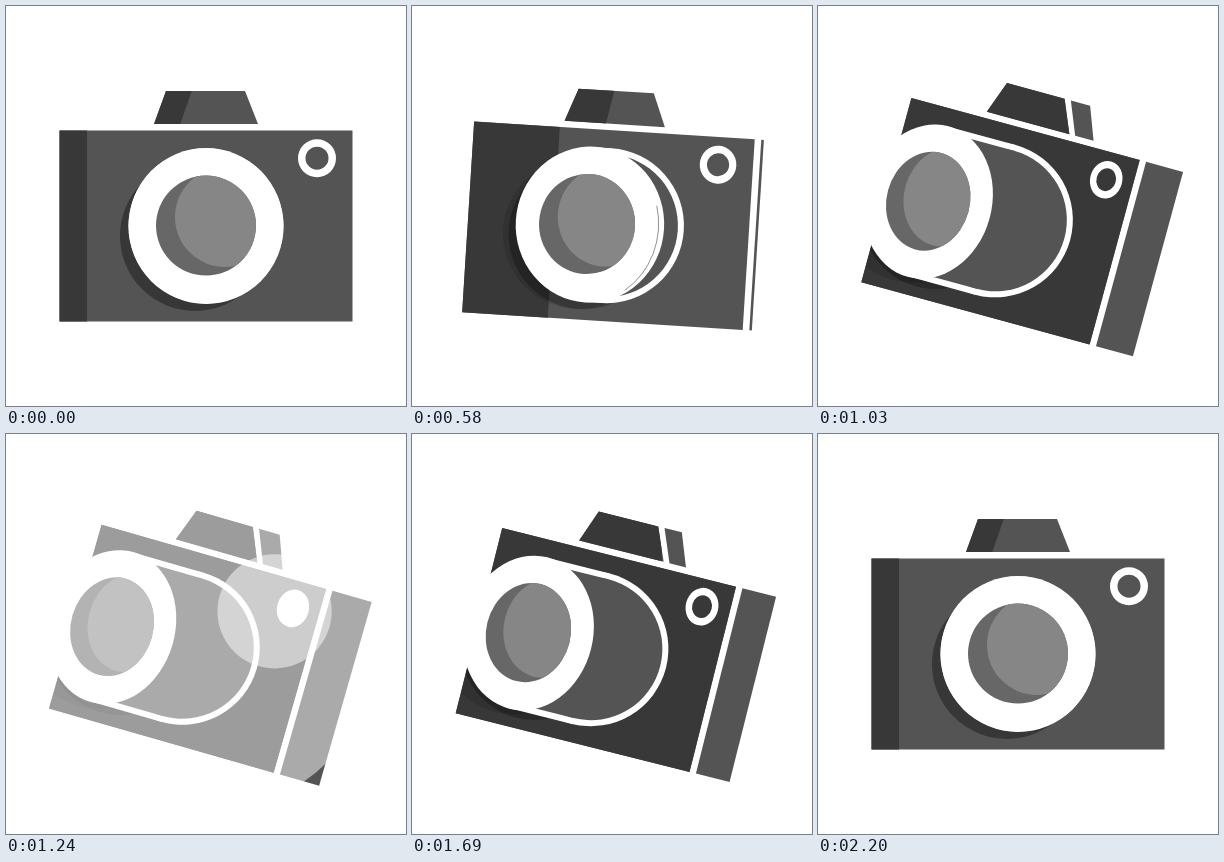
Recreate the animation shown at these times as an HTML page with a canvas. Size 400x400 px, loop 2.23 s.

```html
<!DOCTYPE html>
<html lang="en">
<head>
<meta charset="utf-8">
<title>Camera</title>
<style>
  html, body { margin: 0; width: 100%; height: 100%; overflow: hidden; background: #fff; }
  canvas { display: block; width: 100vw; height: 100vh; }
</style>
</head>
<body>
<canvas id="stage" width="400" height="400"></canvas>
<script>
const ctx = document.getElementById('stage').getContext('2d');
const LIGHT = '#545454', DARK = '#383838', WHITE = '#fff';
const LOOP = 2230, HOLD = 430, STEP = 30, STEPS = 60;
const TOP = -95.5, BOTTOM = 95.5;

const mix = (a, b, k) => a + (b - a) * k;
const clamp = v => Math.max(0, Math.min(1, v));

// Cubic bezier (.333, 0, .12, 1), solved by bisection.
function ease(x) {
  let lo = 0, hi = 1;
  for (let i = 0; i < 30; i++) {
    const s = (lo + hi) / 2, r = 1 - s;
    if (3 * r * r * s * .333 + 3 * r * s * s * .12 + s ** 3 < x) lo = s; else hi = s;
  }
  return lo * lo * (3 - 2 * lo);
}

function ellipse(x, y, rx, ry, fill) {
  ctx.beginPath();
  ctx.ellipse(x, y, rx, ry, 0, 0, Math.PI * 2);
  if (fill) { ctx.fillStyle = fill; ctx.fill(); }
}

function rect(x1, y1, x2, y2, fill) {
  if (x2 <= x1) return;
  ctx.fillStyle = fill;
  ctx.fillRect(x1, y1, x2 - x1, y2 - y1);
}

// Trapezoid with a flat top and bottom; x values for both rows.
function trapezoid(topL, topR, botL, botR, y1, y2, fill) {
  ctx.beginPath();
  ctx.moveTo(topL, y1);
  ctx.lineTo(topR, y1);
  ctx.lineTo(botR, y2);
  ctx.lineTo(botL, y2);
  ctx.closePath();
  if (fill) { ctx.fillStyle = fill; ctx.fill(); }
}

function clipped(path, draw) {
  ctx.save();
  path();
  ctx.clip();
  draw();
  ctx.restore();
}

function drawPrism(p, turn) {
  const y1 = -135, y2 = -102;
  const topL = mix(-40, -48.5, p), botL = mix(-52, -60.5, p);
  const topR = mix(39, 10, turn), botR = mix(52, 24, turn);
  const endTop = mix(39, 38, p), endBot = mix(52, 50.5, p);
  const front = fill => trapezoid(topL, topR, botL, botR, y1, y2, fill);

  front(LIGHT);
  clipped(() => front(), () =>
    trapezoid(-80, -14 + 35 * p, -80, -26 + 59 * p, y1 - 1, y2 + 1, DARK));
  if (topR + 6.3 < endTop) {
    trapezoid(topR + 6.5, endTop, botR + 6, endBot, y1, y2, LIGHT);
  }
}

function drawBody(p, turn) {
  const left = mix(-146.5, -135.9, p), right = mix(146.5, 145, p);
  const edge = mix(146.5, 97.5, turn);
  const front = () => { ctx.beginPath(); ctx.rect(left, TOP, edge - left, BOTTOM - TOP); };

  rect(left, TOP, edge, BOTTOM, LIGHT);
  rect(left, TOP, Math.min(edge, -119 + 269 * p), BOTTOM, DARK);
  rect(edge + 6.6, TOP, right, BOTTOM, LIGHT);
  clipped(front, () => {
    ellipse(-11 - 100 * p, 10, 75, 75, 'rgba(0,0,0,.12)');
    ellipse(-11 - 75 * p, 10, 75, 75, 'rgba(0,0,0,.26)');
  });
}

function drawLens(p) {
  const base = -24.7 * p, face = -98 * p;
  const glass = face - 36 * p * (1 - p) ** 4;
  const rx = 77.5 - 14.5 * p, glassRx = 50 - 8.8 * p;

  // Barrel
  rect(face, -77.5, base, 77.5, WHITE);
  ellipse(base, 0, 77.5, 77.5, WHITE);
  rect(face, -71.5, base, 71.5, LIGHT);
  ellipse(base, 0, 71.5, 71.5, LIGHT);

  // Front ring, with a fine seam while the barrel starts to open
  ellipse(face, 0, rx, 78, WHITE);
  const seam = clamp(p * 10) * clamp((.42 - p) * 5);
  if (seam > 0) {
    ctx.beginPath();
    ctx.ellipse(glass, 0, rx - 2.6, 78, 0, -.3, .95);
    ctx.strokeStyle = `rgba(60,60,60,${seam * .8})`;
    ctx.lineWidth = .7;
    ctx.stroke();
  }

  // Glass
  ellipse(glass, -.4, glassRx, 50, '#676767');
  clipped(() => ellipse(glass, -.4, glassRx, 50), () =>
    ellipse(glass + glassRx * .38, -9, glassRx, 50, '#868686'));
}

function drawButton(p, lit) {
  const k = 1 - .16 * p, x = 111 - 40 * p, y = -67.8;
  ctx.beginPath();
  ctx.ellipse(x, y, 19 * k, 19, 0, 0, Math.PI * 2);
  ctx.ellipse(x, y, 11.5 * k, 11.5, 0, 0, Math.PI * 2);
  ctx.fillStyle = WHITE;
  ctx.fill('evenodd');
  if (lit > 0) ellipse(x, y, 14 * k, 14, `rgba(255,255,255,${lit})`);
}

// Glow circles grow out of the button towards the middle of the stage.
function drawGlow(age, alpha) {
  if (age <= 0 || alpha <= 0) return;
  const r = Math.min(240, 34.6 * age), u = Math.min(1, r / 173);
  ellipse(287 - 87 * u ** 1.4, 174 + 31 * u ** 2, r, r, `rgba(255,255,255,${alpha})`);
}

function draw(time) {
  const t = time % LOOP;
  const n = t < HOLD ? 0 : Math.floor((t - HOLD) / STEP) + 1;
  const half = STEPS / 2;
  const p = n % STEPS === 0 ? 0 : ease(1 - Math.abs(n - half) / half);
  const turn = p ** 1.1;
  const fade = clamp((40 - n) / 6);

  ctx.fillStyle = WHITE;
  ctx.fillRect(0, 0, 400, 400);
  ctx.save();
  ctx.translate(200, 220);
  ctx.rotate(p * 16 * Math.PI / 180);
  drawPrism(p, turn);
  drawBody(p, turn);
  drawLens(p);
  drawButton(p, n >= 27 ? fade : 0);
  ctx.restore();

  drawGlow(n - 23, .5 * fade);
  drawGlow(n - 26.35, .5 * fade);
}

const start = performance.now();
function tick() {
  draw(performance.now() - start);
  requestAnimationFrame(tick);
}
tick();
</script>
</body>
</html>
```
